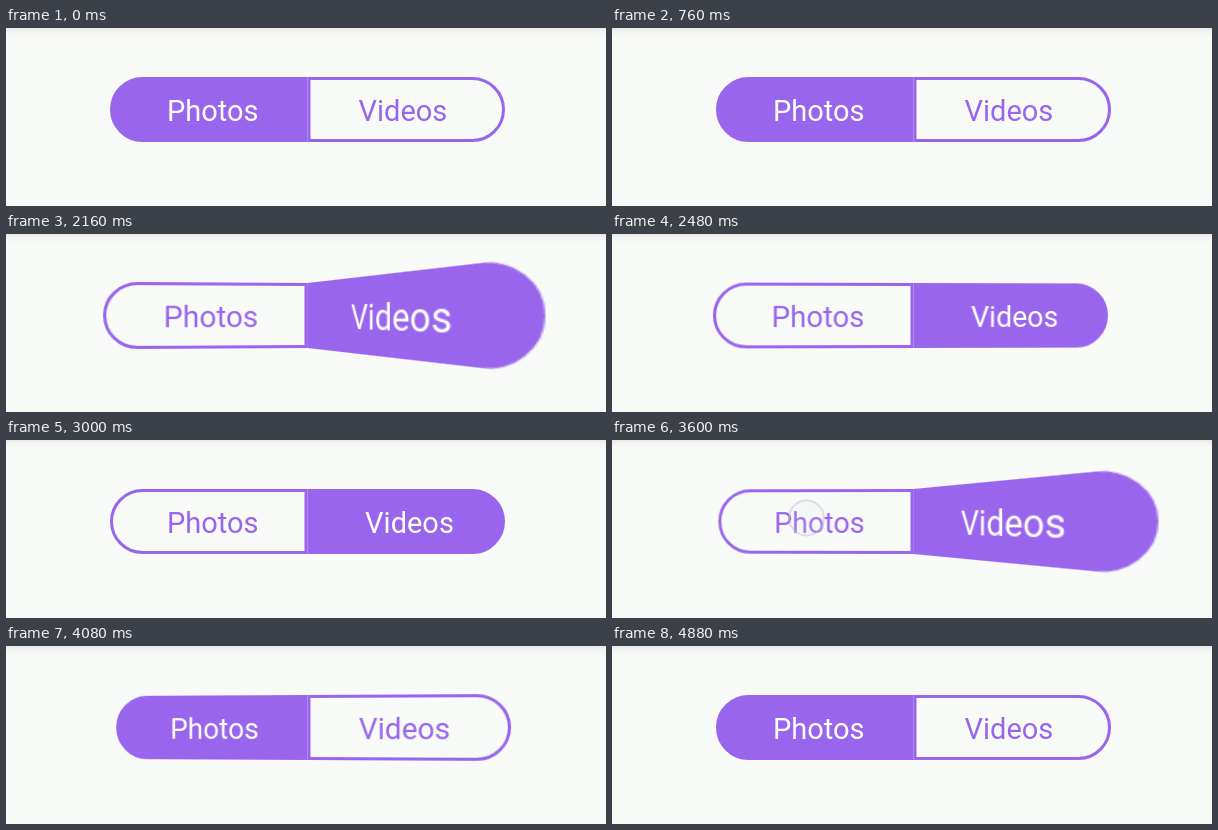
An HTML page for the animation above (5.04 s loop, 600 px wide and 178 px high).

```html
<!DOCTYPE html>
<html lang="en">
<head>
<meta charset="utf-8">
<title>Flip switch</title>
<style>
  html, body { margin: 0; width: 100%; height: 100%; overflow: hidden; }
  body { position: relative; background: linear-gradient(#e8e9e7, #f3f4f1 3px, #f8faf7 9px); }
  svg { position: absolute; left: 0; top: 0; transform-origin: 301.5px 81.5px; }
  path { fill: none; stroke: #9965ec; stroke-width: 3; }
  text { font: 29px Roboto, sans-serif; text-anchor: middle; fill: #9965ec; }
  .solid path { fill: #9965ec; }
  .solid text { fill: #fff; }
  circle { fill: rgba(225, 225, 240, .12); stroke: rgba(190, 190, 218, .5); stroke-width: 2; }
</style>
</head>
<body>
<script>
const LOOP = 5040, FLIP = 475, TILT = 4.8;
const flips = [
  { tap: 1680, start: 1755, decay: 230, dir: 1, x: 414, y: 88 },
  { tap: 3370, start: 3354, decay: 363, dir: -1, x: 194.5, y: 78 }
];

function layer(content, cls = '') {
  document.body.insertAdjacentHTML('beforeend',
    `<svg class="${cls}" width="600" height="178">${content}</svg>`);
  return document.body.lastElementChild;
}

// One half of the pill; side is -1 for left and 1 for right
function half(side, label, x, cls) {
  return layer(`<g transform="translate(301.5 81.5)">
    <path transform="scale(${side} 1)" d="M1.5-31H165a31 31 0 0 1 0 62H1.5Z"/>
    <text x="${x}" y="11">${label}</text></g>`, cls);
}

const outlines = [half(-1, 'Photos', -94.7), half(1, 'Videos', 95.4)];
const pages = [half(-1, 'Photos', -94.7, 'solid'), half(1, 'Videos', 102, 'solid')];
const ring = layer('<circle r="17.5"/>').firstElementChild;

function place(el, angle, visible) {
  el.style.transform = `perspective(327px) rotateY(${angle}deg)`;
  el.style.visibility = visible ? 'visible' : 'hidden';
}

function draw(now) {
  const t = now % LOOP;
  const { tap, start, decay, dir, x, y } = flips[t < 3300 ? 0 : 1];
  const u = Math.min(1, Math.max(0, (t - start) / FLIP));
  const turn = u ** 2.2;
  const rest = Math.max(0, t - start - FLIP);

  // The board leans with the page, then eases back after it lands
  const tilt = dir * TILT * turn * Math.exp(-((rest / decay) ** 2));
  const angle = (dir > 0 ? 180 * turn : 180 - 180 * turn) + tilt;
  const onRight = angle > 90;
  const moving = u > 0 && u < 1;

  outlines.forEach((el, i) => place(el, tilt, moving || onRight !== (i === 1)));
  place(pages[0], angle, !onRight);
  place(pages[1], angle - 180, onRight);

  const touch = (t - tap) / 370;
  ring.setAttribute('transform', `translate(${x} ${y})`);
  ring.setAttribute('opacity', touch > 0 && touch < 1 ? Math.sin(Math.PI * touch) : 0);
}

const origin = performance.now();
function tick() {
  draw(performance.now() - origin);
  requestAnimationFrame(tick);
}
tick();
</script>
</body>
</html>
```
